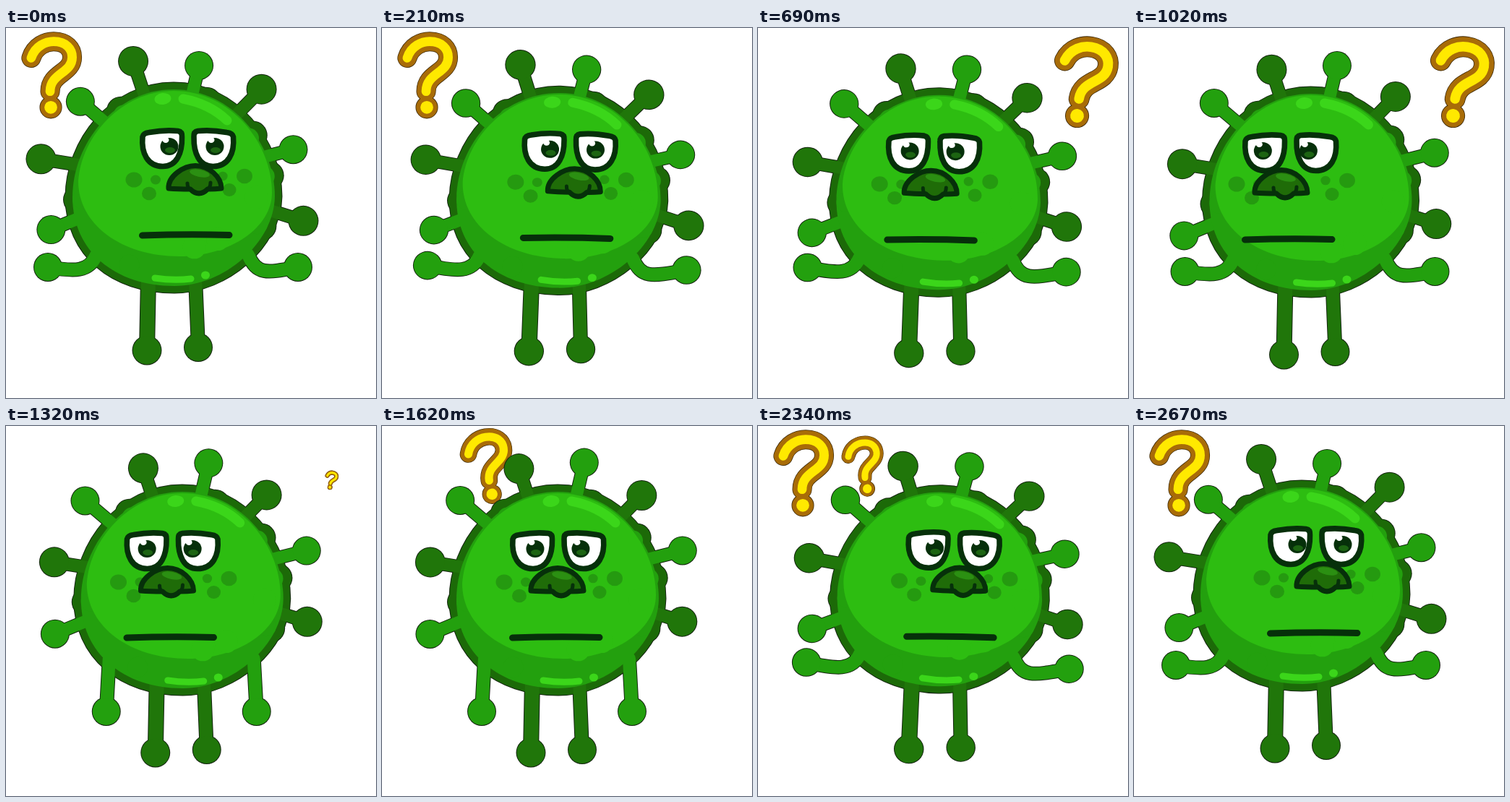
An HTML page with a canvas that plays this animation: 512 by 512 pixels, repeating every 2700 ms.

```html
<!DOCTYPE html>
<html lang="en">
<head>
<meta charset="utf-8">
<title>Puzzled virus</title>
<style>
html, body { margin: 0; width: 100%; height: 100%; overflow: hidden; background: #fff; }
canvas { display: block; width: 100vmin; height: 100vmin; }
</style>
</head>
<body>
<canvas id="stage" width="512" height="512"></canvas>
<script>
const ctx = document.getElementById('stage').getContext('2d');
const LOOP = 2700, STEP = 30, TAU = Math.PI * 2;
const CX = 230, CY = 210;
const INK = '#06300a', EDGE = '#14240f', RIM = '#1c6a08', DARK = '#20760a',
      MID = '#23a00e', LIGHT = '#2dbd11', SHINE = '#3bd61a', SPOT = '#259a10';

const rest = { x: 0, y: 0, turn: 0, stretch: -5, face: 0, nose: 0 };
const poses = [
  { t: 0, ...rest },
  { t: 390, x: 23, y: 7, turn: .032, stretch: -4, face: 14, nose: -6 },
  { t: 1020, x: 12.5, y: 6, turn: 0, stretch: 1, face: -35, nose: -23 },
  { t: 1620, x: 11, y: 6, turn: 0, stretch: 2.5, face: -8, nose: -11 },
  { t: 2010, x: 30, y: 0, turn: 0, stretch: 4, face: 10.5, nose: -10 },
  { t: 2340, x: 20, y: 5, turn: .025, stretch: -1, face: 18.5, nose: -1.5 },
  { t: 2670, ...rest },
  { t: LOOP, ...rest }
];

const marks = [
  { x: 63, y: 65.5, size: .985, turn: 0, start: 2190 },
  { x: 450, y: 75, size: 1.05, turn: .157, start: 285 },
  { x: 147, y: 56, size: .86, turn: -.157, start: 1385 }
];

const bodyBumps = [24, 119, 173, 237, 290, 325, 352];
const lightBumps = [18, 60, 77];
const spots = [[177, 210, 11.5], [207, 210, 7], [198, 229, 10]];

const body = new Path2D('M232 85C313 85 372 160 372 233C371 297 302 357 233 357C150 357 92 308 92 234C92 160 151 85 232 85Z');
const lit = new Path2D('M232 87C312 87 368 160 368 228C368 276 310 316 240 316C160 316 100 272 100 212C104 150 160 87 232 87Z');
const eye = new Path2D('M189 150Q190 145 198 144Q220 140 238 142Q244 143 243.5 150C244 173 236 191 217 191C196 191 187 173 189 150Z');
const nose = new Path2D('M225 222C224 205 246 190.5 262 190.5C281 190.5 298 206 298 222Q290 223 279 223Q267 235 255 223Q238 223 225 222Z');
const nostrils = new Path2D('M251 215Q251 222 256 224Q267 234 278 224Q283 221 283 214');
const mouth = new Path2D('M188.5 287Q250 285 309 286.5');
const hook = new Path2D('M34.5 41C40 24 55 18 66 18C84 18 92 29 92 40C92 63 61 62 61 88');

const clamp = v => Math.max(0, Math.min(1, v));
const smooth = u => u * u * (3 - 2 * u);
const rad = deg => deg * TAU / 360;

function poseAt(t) {
  const i = poses.findIndex(p => p.t > t), a = poses[i - 1], b = poses[i];
  const u = smooth((t - a.t) / (b.t - a.t)), pose = {};
  for (const key in rest) pose[key] = a[key] + (b[key] - a[key]) * u;
  return pose;
}

function oval(x, y, rx, ry, color, turn = 0) {
  ctx.fillStyle = color;
  ctx.beginPath();
  ctx.ellipse(x, y, rx, ry, turn, 0, TAU);
  ctx.fill();
}

function line(path, width, color) {
  ctx.lineWidth = width;
  ctx.strokeStyle = color;
  ctx.stroke(path);
}

function fill(path, color) {
  ctx.fillStyle = color;
  ctx.fill(path);
}

// circles set at the given angles on an ellipse
function ring(angles, cx, cy, rx, ry, r, color) {
  for (const a of angles.map(rad)) oval(cx + rx * Math.cos(a), cy + ry * Math.sin(a), r, r, color);
}

function limb(path, x, y, r, width, color) {
  line(path, width, color);
  oval(x, y, r, r, color);
}

function straight(rootX, rootY, x, y, r, width, color) {
  limb(new Path2D(`M${rootX} ${rootY}L${x} ${y}`), x, y, r, width, color);
}

function drawRim(color, grow) {
  fill(body, color);
  line(body, 19 + grow * 2, color);
  ring(bodyBumps, 232, 222, 134, 128, 19 + grow, color);
}

// eight spikes, light and dark in turn, longer towards the bottom
function drawSpikes(stretch, dark, light, grow) {
  for (let i = 0; i < 8; i++) {
    const odd = i % 2, a = rad(157.6 + 31.4 * i), cos = Math.cos(a), sin = Math.sin(a);
    const reach = 181 + 14 * sin + (odd ? -stretch : stretch), root = 123;
    straight(CX + cos * root, CY + sin * root, CX + cos * reach, CY + sin * reach,
      (odd ? 20 : 19) + grow, 17 + grow * 2, odd ? dark : light);
  }
}

function drawLimbs({ stretch, turn }, armsDown, dark, light, grow) {
  const r = 19 + grow, w = 18 + grow * 2, spread = turn * 290;
  drawSpikes(stretch, dark, light, grow);
  straight(197, 346, 195, 446, r + .5, w + 2, dark);
  straight(262, 346, 266, 442, r, w, dark);
  if (armsDown) {
    straight(131, 316, 127, 389, r, w, light);
    straight(331, 316, 335, 389, r, w, light);
    return;
  }
  const y = 331 - spread * .4, left = 58 - spread * .8, right = 404 + spread;
  limb(new Path2D(`M125 314C115 338 95 337 ${left} ${y}`), left, y, r, w, light);
  limb(new Path2D(`M335 314C348 342 360 339 ${right} ${y}`), right, y, r, w, light);
}

function drawBody(shine) {
  fill(body, MID);
  ring(bodyBumps, 232, 222, 127, 121, 14, MID);
  fill(lit, LIGHT);
  ring(lightBumps, 234, 202, 118, 104, 16, LIGHT);
  ctx.save();
  ctx.translate(shine, 0);
  oval(217, 98, 11.5, 8, SHINE, -.1);
  line(new Path2D('M245 98Q282 105 306 128'), 13, SHINE);
  line(new Path2D('M206 346Q232 350 256 347'), 9, SHINE);
  oval(276, 342, 6, 5.5, SHINE);
  ctx.restore();
}

function drawEye(x, flip, pupilX) {
  const shape = new Path2D();
  shape.addPath(eye, new DOMMatrix([flip, 0, 0, 1, x, 0.5]));
  fill(shape, '#fff');
  oval(pupilX, 164, 12.5, 12, INK);
  oval(pupilX + 1, 169, 7, 4, '#1c6412');
  oval(pupilX - 5, 155, 4.5, 4, '#fff');
  line(shape, 7.6, INK);
}

function drawNose() {
  fill(nose, '#1f6c08');
  oval(268, 201, 14, 5, '#2b8f12', .2);
  line(nose, 7, INK);
  line(nostrils, 5, INK);
}

function drawFace(shift) {
  for (const [x, y, r] of spots) {
    oval(x, y, r, r * .92, SPOT);
    oval(507 - x, y - 5, r * .95, r * .9, SPOT);
  }
  drawEye(0, 1, 226 + shift * .55);
  drawEye(503.5, -1, 289 + shift * .55);
  line(mouth, 9, INK);
  ctx.translate(shift, 0);
  drawNose();
}

function drawMark({ x, y, size, turn, start }, t) {
  const life = 1055, age = (t - start + LOOP) % LOOP;
  if (age >= life) return;
  const grow = 1 - (1 - clamp(age / 130)) ** 2;
  const shrink = 1 - clamp((age - life + 180) / 180) ** 2;
  const scale = size * grow * shrink;
  ctx.save();
  ctx.translate(x, y);
  ctx.rotate(turn);
  ctx.scale(scale, scale);
  ctx.translate(-63, -65.5);
  limb(hook, 62, 110.5, 15.8, 27.5, '#3a2606');
  limb(hook, 62, 110.5, 15, 26, '#a86c08');
  limb(hook, 62, 110.5, 9, 13, '#ffe900');
  ctx.restore();
}

function place(dx, dy, turn, squash) {
  ctx.translate(CX + dx, CY + dy);
  ctx.rotate(turn);
  ctx.scale(1 + squash, 1 - squash);
  ctx.translate(-CX, -CY);
}

function draw(t) {
  const pose = poseAt(t), armsDown = t >= 1290 && t < 2190;
  ctx.clearRect(0, 0, 512, 512);
  ctx.lineCap = ctx.lineJoin = 'round';
  for (const mark of marks) drawMark(mark, t);

  ctx.save();
  place(pose.x, pose.y, pose.turn, pose.turn / 2);
  drawLimbs(pose, armsDown, EDGE, EDGE, 1);
  drawRim(EDGE, 1);
  drawRim(RIM, 0);
  drawLimbs(pose, armsDown, DARK, MID, 0);
  drawBody(pose.y);
  ctx.restore();

  ctx.save();
  place(pose.face, pose.y, pose.turn * .7, 0);
  drawFace(pose.nose);
  ctx.restore();
}

const begin = performance.now();
function tick() {
  const t = (performance.now() - begin) % LOOP;
  draw(Math.floor(t / STEP) * STEP);
  requestAnimationFrame(tick);
}
tick();
</script>
</body>
</html>
```
